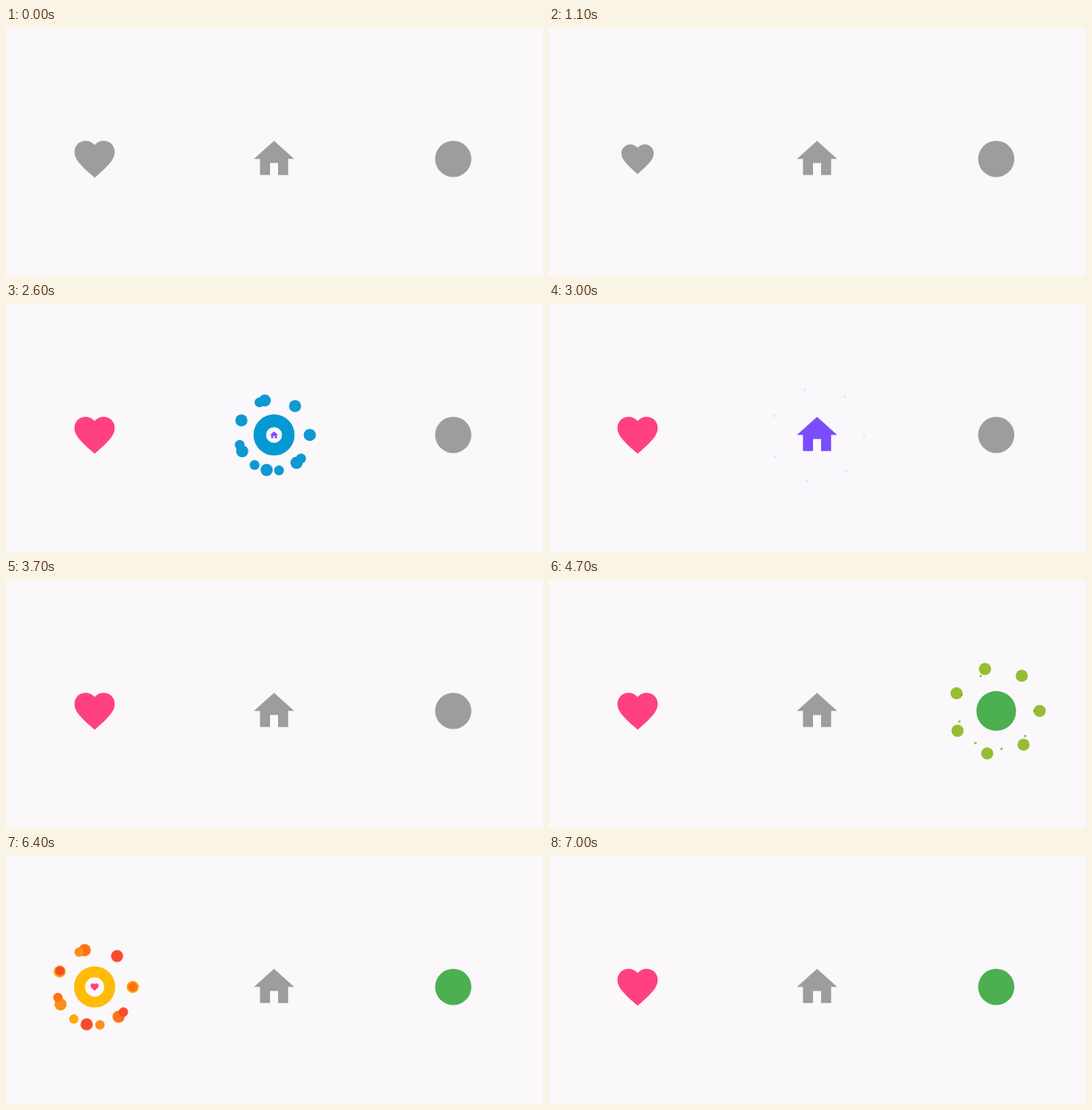
Animation of 600x277 px, one loop 7.2 s. Source, as an HTML page with a canvas:

```html
<!DOCTYPE html>
<html lang="en">
<head>
<meta charset="utf-8">
<title>Spark buttons</title>
<style>
  html, body { margin: 0; width: 100%; height: 100%; overflow: hidden; background: #faf8fb; }
  canvas { display: block; width: 600px; height: 277px; }
</style>
</head>
<body>
<canvas id="stage"></canvas>
<script>
const W = 600, H = 277, LOOP = 7200, CY = 146.3;
const GREY = '#9e9c9f';
const UNIT = 2.25;               // pixels per icon unit (24 unit grid)
const DISC = 23, DOT = 6.8, REACH = 53.4;

const heart = new Path2D('M12 21.35l-1.45-1.32C5.4 15.36 2 12.28 2 8.5 2 5.42 4.42 3 7.5 3c1.74 0 3.41.81 4.5 2.09C13.09 3.81 14.76 3 16.5 3 19.58 3 22 5.42 22 8.5c0 3.78-3.4 6.86-8.55 11.54L12 21.35z');
const home = new Path2D('M10 20v-6h4v6h5v-8h3L12 3 2 12h3v8z');
const disc = new Path2D('M3 12a9 9 0 1 0 18 0a9 9 0 1 0 -18 0z');

// on: moments the spark begins; off: moments the button is released to grey
const buttons = [
  { x: 99, icon: heart, color: '#ff4081', on: [1151, 6155], off: [5430],
    ring: [[255, 87, 34], [255, 187, 5]],
    dots: [[255, 193, 7], [255, 152, 0], [255, 87, 34], [244, 67, 54]] },
  { x: 299.5, icon: home, color: '#7c4dff', on: [2366], off: [3530],
    ring: [[3, 155, 216], [4, 153, 210]], dots: [[14, 153, 210]] },
  { x: 499.7, icon: disc, color: '#4caf50', on: [4251], off: [],
    ring: [[134, 184, 14], [134, 184, 14]], dots: [[124, 173, 0]] }
];

const canvas = document.getElementById('stage');
const ctx = canvas.getContext('2d');
const ratio = window.devicePixelRatio || 1;
canvas.width = W * ratio;
canvas.height = H * ratio;

const clamp = (v, lo = 0, hi = 1) => Math.min(hi, Math.max(lo, v));
const map = (v, a, b, from, to) => from + (to - from) * clamp((v - a) / (b - a));
const decelerate = t => 1 - (1 - t) ** 2;
const smooth = t => (1 - Math.cos(Math.PI * t)) / 2;
const overshoot = t => (t - 1) ** 2 * (5 * (t - 1) + 4) + 1;
const mix = (a, b, k) => `rgb(${a.map((v, i) => Math.round(v + (b[i] - v) * k)).join()})`;
const ease = (s, start, length, curve) => curve(clamp((s - start) / length));

function circle(x, y, r, fill) {
  ctx.fillStyle = fill;
  ctx.beginPath();
  ctx.arc(x, y, Math.max(0, r), 0, 2 * Math.PI);
  ctx.fill();
}

function drawDots(b, s) {
  const p = ease(s, -56, 819, smooth);
  if (s < 0 || p >= 1) return;
  const near = REACH * 0.8;
  const outerR = p < 0.3 ? map(p, 0, 0.3, 0, near) : map(p, 0.3, 1, near, REACH);
  const innerR = map(p, 0, 0.3, 0, near);
  const outerSize = map(p, 0.7, 1, DOT, 0);
  const innerSize = p < 0.5 ? map(p, 0.2, 0.5, DOT, DOT * 0.3) : map(p, 0.5, 1, DOT * 0.3, 0);
  const shift = p < 0.5 ? 0 : 1;
  const blend = p < 0.5 ? p * 2 : p * 2 - 1;
  const n = b.dots.length;
  const paint = i => mix(b.dots[(i % 4 + shift) % n], b.dots[(i % 4 + shift + 1) % n], blend);

  const orbit = (radius, size, step, first) => {
    for (let i = 0; i < 7; i++) {
      const a = i * step * Math.PI / 180;
      circle(b.x + radius * Math.cos(a), CY + radius * Math.sin(a), size, paint(i + first));
    }
  };
  ctx.globalAlpha = map(p, 0.6, 1, 1, 0);
  orbit(outerR, outerSize, 51, 0);
  orbit(innerR, innerSize, 41, 1);
  ctx.globalAlpha = 1;
}

function drawRing(b, s) {
  if (s < 0 || s >= 400) return;
  const grow = 0.1 + 0.9 * ease(s, 0, 250, decelerate);
  const hole = s < 200 ? 0 : 0.1 + 0.9 * ease(s, 200, 200, decelerate);
  const outer = DISC * grow, inner = DISC * hole;
  if (inner >= outer) return;
  ctx.strokeStyle = mix(b.ring[0], b.ring[1], map(grow, 0.5, 1, 0, 1));
  ctx.lineWidth = outer - inner;
  ctx.beginPath();
  ctx.arc(b.x, CY, (outer + inner) / 2, 0, 2 * Math.PI);
  ctx.stroke();
}

function drawIcon(b, scale, color) {
  if (scale <= 0) return;
  ctx.save();
  ctx.translate(b.x, CY);
  ctx.scale(UNIT * scale, UNIT * scale);
  ctx.translate(-12, -12);
  ctx.fillStyle = color;
  ctx.fill(b.icon);
  ctx.restore();
}

const last = (times, t) => Math.max(-Infinity, ...times.filter(v => v <= t));

function drawButton(b, t) {
  const on = last(b.on, t), off = last(b.off, t);
  const active = on > off;
  const s = t - on;
  let scale = 1;

  if (active) {
    drawDots(b, s);
    drawRing(b, s);
    scale = s < 200 ? 0 : 0.2 + 0.8 * ease(s, 250, 250, overshoot);
  } else if (off > -Infinity) {
    scale = 0.8 + 0.2 * ease(t, off, 150, decelerate);
  }

  // finger press shortly before each toggle
  for (const [times, lead] of [[b.on, 180], [b.off, 150]]) {
    for (const v of times) {
      if (t >= v - lead && t < v) scale = 1 - 0.2 * ease(t, v - lead, 150, decelerate);
    }
  }
  drawIcon(b, scale, active ? b.color : GREY);
}

function frame(now) {
  const t = Math.max(0, now - begin) % LOOP;
  ctx.setTransform(ratio, 0, 0, ratio, 0, 0);
  ctx.fillStyle = '#faf8fb';
  ctx.fillRect(0, 0, W, H);
  for (const b of buttons) drawButton(b, t);
  requestAnimationFrame(frame);
}

const begin = performance.now();
frame(begin);
</script>
</body>
</html>
```
